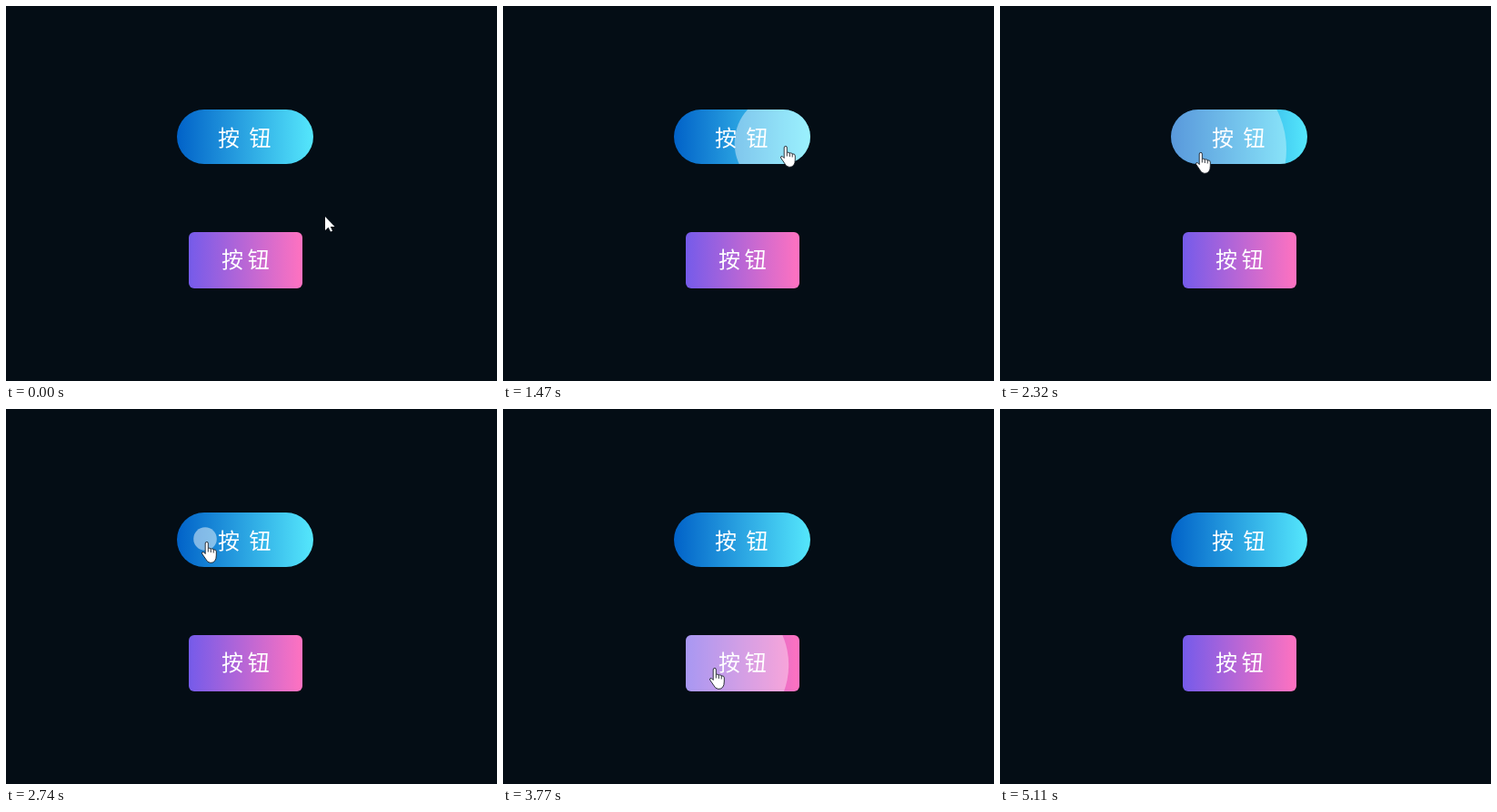
Animation of 540x413 px, one loop 5720 ms. Source, as an HTML page:

```html
<!DOCTYPE html>
<html lang="zh-CN">
<head>
<meta charset="utf-8">
<title>Ripple buttons</title>
<style>
html, body { margin: 0; width: 100%; height: 100%; overflow: hidden; background: #040d15; }
svg { display: block; }
text { font: 500 24px "Noto Sans CJK SC", "Noto Sans CJK", sans-serif; fill: #fff; }
</style>
</head>
<body>
<svg width="540" height="413" viewBox="0 0 540 413">
  <defs>
    <linearGradient id="blue"><stop stop-color="#0162c8"/><stop offset="1" stop-color="#55e7fc"/></linearGradient>
    <linearGradient id="pink"><stop stop-color="#755bea"/><stop offset="1" stop-color="#ff72c0"/></linearGradient>
    <clipPath id="pill"><rect x="188" y="114" width="150" height="60" rx="30"/></clipPath>
    <clipPath id="box"><rect x="201" y="249" width="125" height="62" rx="6"/></clipPath>
  </defs>
  <g class="button" clip-path="url(#pill)">
    <rect x="188" y="114" width="150" height="60" fill="url(#blue)"/>
  </g>
  <g class="button" clip-path="url(#box)">
    <rect x="201" y="249" width="125" height="62" fill="url(#pink)"/>
  </g>
  <text x="233" y="154" letter-spacing="10.5">按钮</text>
  <text x="237" y="288" letter-spacing="4.7">按钮</text>
  <path id="arrow" fill="#fff" d="M0 0V15L3.5 11.7 6 16.6 8 15.8 5.8 11H10.5Z"/>
  <g id="hand" stroke="#1a2028" stroke-width=".9" stroke-linejoin="round">
    <path fill="#fff" d="M4.7 2Q4.7 .4 6.3 .4T7.8 2V7.5Q9.4 6.5 10.8 8Q12.4 7.2 13.7 8.8Q16.8 8.6 16.8 11V15Q16.8 23.4 10.5 23.4Q7 23.4 5 19L.9 13Q1 10.8 3 11.8L4.7 13.5Z"/>
    <path fill="none" d="M7.8 7.5V11.5M10.8 8V12M13.7 8.8V12.5"/>
  </g>
</svg>
<script>
const LOOP = 5720, STEP = 60, LIFE = 490, SPEED = 0.64;

// Spans in which the picture advances, one step at a time
const bursts = [[0, 0], [860, 1160], [1410, 2010], [2200, 3220], [3650, 4130], [4380, 5100]];

// Straight pointer moves: start, end, x and y reached
const home = [351, 232];
const moves = [
  [800, 860, 346, 230], [860, 1160, 311, 155],
  [1720, 1950, 224, 156], [1950, 2010, 221, 162],
  [2560, 2680, 221, 147], [3100, 3220, 233, 286],
  [3770, 4070, 312, 295], [4740, 5100, 620, 420]
];
const clickTimes = [1385, 2170, 2720, 3640, 4325];

const buttons = [...document.querySelectorAll(".button")];
const arrow = document.getElementById("arrow");
const hand = document.getElementById("hand");

function stepped(t) {
  const [from, to] = bursts.findLast(b => b[0] <= t);
  return Math.min(to, from + Math.floor((t - from) / STEP) * STEP);
}

function pointer(t) {
  let [x, y] = home;
  for (const [from, to, endX, endY] of moves) {
    const k = Math.min(1, Math.max(0, (t - from) / (to - from)));
    x += (endX - x) * k;
    y += (endY - y) * k;
  }
  return [Math.round(x), Math.round(y)];
}

function buttonAt(x, y) {
  return buttons.find(button => {
    const r = button.querySelector("rect").getBBox();
    return x >= r.x && x < r.x + r.width && y >= r.y && y < r.y + r.height;
  });
}

const ripples = clickTimes.map(time => {
  const [x, y] = pointer(time);
  const circle = document.createElementNS("http://www.w3.org/2000/svg", "circle");
  circle.setAttribute("cx", x - 2);
  circle.setAttribute("cy", y - 4);
  circle.setAttribute("fill", "#fff");
  buttonAt(x, y).append(circle);
  return { time, circle };
});

function show(el, on, x, y) {
  el.setAttribute("visibility", on ? "visible" : "hidden");
  el.setAttribute("transform", `translate(${x} ${y})`);
}

function draw(now) {
  const t = stepped(now % LOOP);
  for (const { time, circle } of ripples) {
    const age = Math.min(LIFE, Math.max(0, t - time));
    circle.setAttribute("r", age * SPEED);
    circle.setAttribute("opacity", 0.5 * (1 - age / LIFE));
  }
  const [x, y] = pointer(t);
  const over = Boolean(buttonAt(x, y));
  show(arrow, !over, x, y);
  show(hand, over, x - 6.5, y - 1);
}

const start = performance.now();
function tick() {
  draw(performance.now() - start);
  requestAnimationFrame(tick);
}
tick();
</script>
</body>
</html>
```
